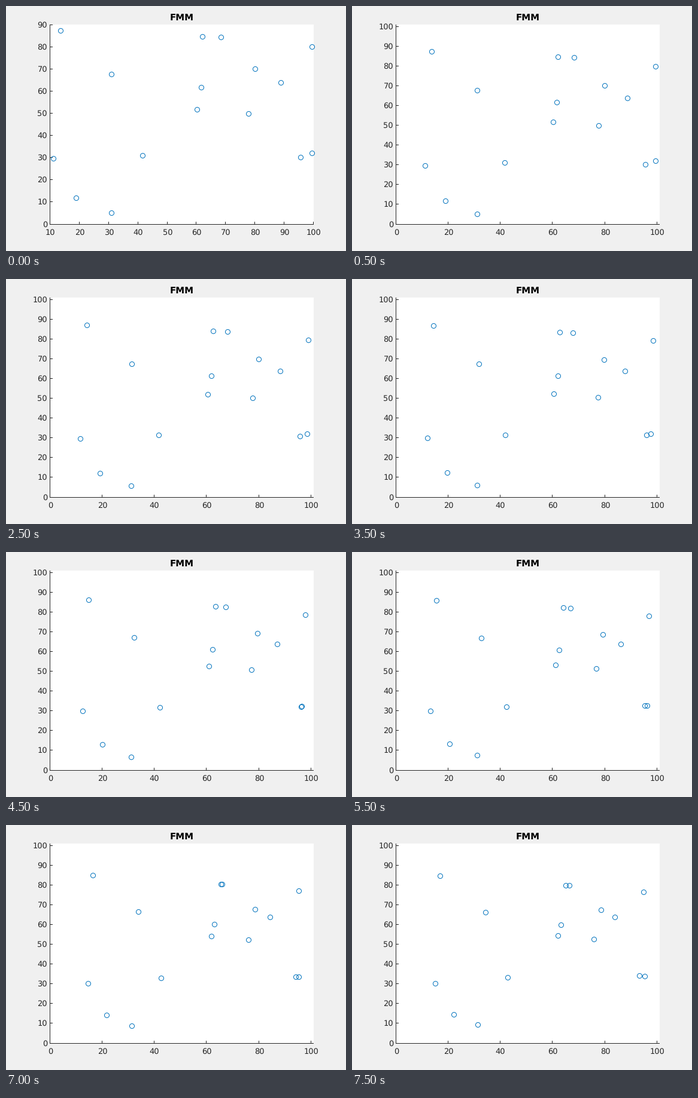
A matplotlib script for the animation above (8 s loop, 568 by 410 pixels).

```python
import matplotlib.pyplot as plt
import numpy as np
from matplotlib.animation import FuncAnimation
from matplotlib.patches import Circle, Rectangle

W, H, DPI = 568, 410, 64
FRAMES, INTERVAL = 16, 500
LEFT, RIGHT, TOP, BOTTOM = 74, 514, 31, 365
INK, BLUE, GREY = "#262626", "#0072BD", "#f0f0f0"
G, SOFTEN = 1 / (2 * np.pi), 0.2

# Where the bodies start, at rest
START = np.array([
    (13.62, 87.27), (31.0, 67.6), (62.0, 84.68), (68.4, 84.36),
    (99.56, 79.96), (80.12, 70.15), (88.83, 63.86), (61.72, 61.62),
    (60.17, 51.62), (77.82, 49.9), (11.16, 29.72), (41.63, 31.06),
    (95.68, 30.25), (99.56, 31.95), (18.88, 11.88), (31.05, 5.12),
])

plt.rcParams["font.family"] = "DejaVu Sans"
plt.rcParams["text.hinting"] = "none"
fig = plt.figure(figsize=(W / DPI, H / DPI), dpi=DPI, facecolor=GREY)
ax = fig.add_axes([0, 0, 1, 1])
ax.set(xlim=(0, W), ylim=(H, 0))
ax.axis("off")


def pull(pos):
    """Acceleration of equal masses under planar (1/r) gravity."""
    d = pos[None] - pos[:, None]
    r2 = (d ** 2).sum(axis=2, keepdims=True) + SOFTEN ** 2
    return G * (d / r2).sum(axis=1)


def simulate(pos, steps):
    trail, vel = [pos], np.zeros_like(pos)
    for _ in range(steps - 1):
        vel = vel + pull(pos)
        pos = pos + vel
        trail.append(pos)
    return trail


def box(x, y, w, h, color):
    return ax.add_patch(Rectangle((x, y), w, h, fc=color, ec="none", lw=0,
                                  antialiased=False))


def label(x, y, text, px, **kw):
    return ax.text(x, y, text, fontsize=px * 72 / DPI, va="baseline", **kw)


class View:
    """Axis limits with their ticks and labels."""

    def __init__(self, x0, x1, y1, xticks, yticks):
        self.x0 = x0
        self.sx = (RIGHT - LEFT) / (x1 - x0)
        self.sy = (BOTTOM - TOP) / y1
        self.parts = []
        for v in xticks:
            x = max(int(self.px(v) - .5), LEFT - 1)
            self.parts += [box(x, BOTTOM - 4, 1, 4, INK),
                           label(x + 1, 383, str(v), 13, ha="center", color=INK)]
        for v in yticks:
            y = int(self.py(v))
            self.parts += [box(LEFT, y, 4, 1, INK),
                           label(69, y + 5, str(v), 13, ha="right", color=INK)]

    def px(self, x):
        return LEFT + (x - self.x0) * self.sx

    def py(self, y):
        return BOTTOM - y * self.sy

    def show(self, on):
        for part in self.parts:
            part.set_visible(on)


box(LEFT, TOP, RIGHT - LEFT, BOTTOM - TOP, "white")
box(LEFT - 1, TOP, 1, BOTTOM - TOP + 1, INK)
box(LEFT - 1, BOTTOM, RIGHT - LEFT + 1, 1, INK)
label(294, 24, "FMM", 15, ha="center", weight="bold", color="black")

tight = View(10, 100, 90, range(10, 101, 10), range(0, 91, 10))
wide = View(0, 101, 101, range(0, 101, 20), range(0, 101, 10))
dots = [ax.add_patch(Circle((0, 0), 4, fill=False, ec=BLUE, lw=72 / DPI, zorder=3))
        for _ in START]
trail = simulate(START, FRAMES)


def update(t):
    view = tight if t == 0 else wide
    tight.show(view is tight)
    wide.show(view is wide)
    for dot, (x, y) in zip(dots, trail[t]):
        # markers sit on whole pixels
        dot.center = np.floor(view.px(x)) + .5, np.floor(view.py(y) + .5) + .5
    return tight.parts + wide.parts + dots


anim = FuncAnimation(fig, update, frames=FRAMES, interval=INTERVAL,
                     repeat=True, repeat_delay=0, blit=False)
plt.show()
```
